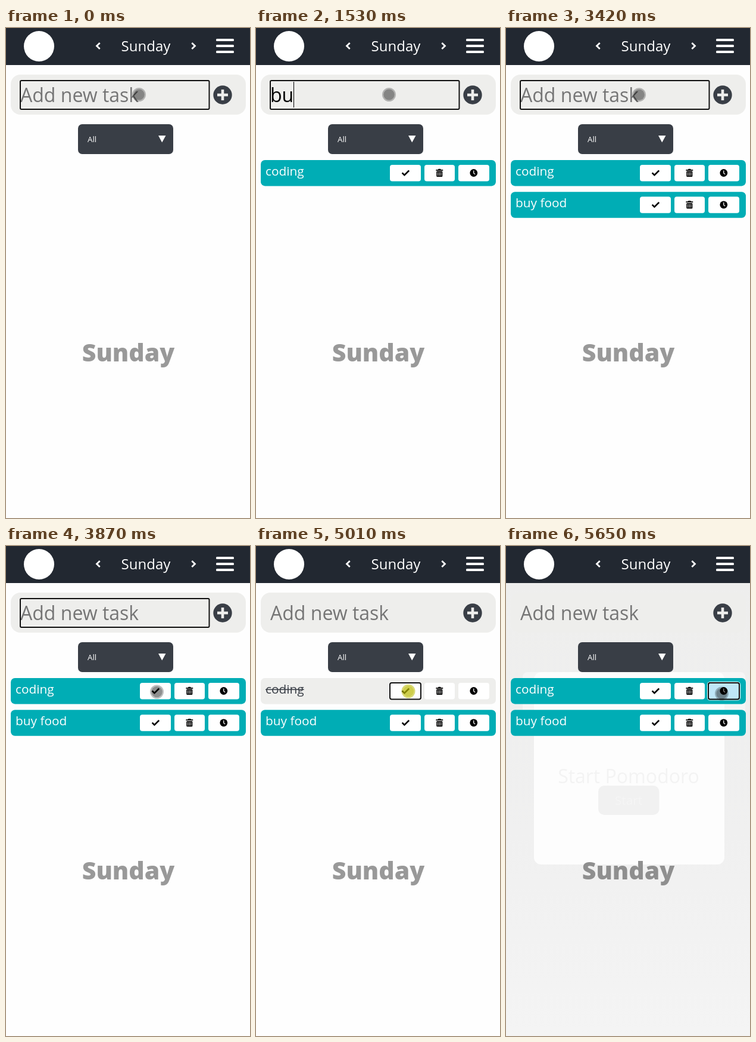
An HTML page with a canvas for the animation above (5670 ms loop, 410 by 820 pixels).

```html
<!DOCTYPE html>
<html lang="en">
<head>
<meta charset="utf-8">
<title>Day planner</title>
<style>
  html, body { margin: 0; width: 100%; height: 100%; overflow: hidden; background: #fefefe; }
  canvas { display: block; }
</style>
</head>
<body>
<canvas id="stage" width="410" height="820"></canvas>
<script>
const ctx = document.getElementById('stage').getContext('2d');
const LOOP = 5670;
const NAVY = '#222831', SLATE = '#393e46', TEAL = '#00adb5', PALE = '#eeeeec';
const BUTTONS = [225, 283, 340];

// [time, input text, number of tasks]
const TYPING = [
  [0, '', 0], [560, 'co', 0], [620, 'cod', 0], [680, 'codi', 0], [740, 'coding', 0],
  [800, '', 1], [1530, 'bu', 1], [1690, 'buy', 1], [1840, 'buy ', 1],
  [1990, 'buy f', 1], [2040, 'buy fo', 1], [2090, 'buy foo', 1],
  [2250, 'buy food', 1], [2420, '', 2]
];

// [time, x, y]
const POINTER = [
  [0, 223.5, 111.5], [3410, 223.5, 111.5], [3870, 253.5, 244], [4380, 253.5, 244],
  [4570, 268.5, 381.5], [4640, 268.5, 383], [4880, 256, 243], [5070, 256, 243],
  [5430, 362.5, 247], [LOOP, 362.5, 247]
];

// [press, release]
const CLICKS = [[4300, 4390], [4910, 5050], [5460, 5590]];

const clamp = v => Math.max(0, Math.min(1, v));
const ramp = (t, a, b) => clamp((t - a) / (b - a));
const ease = v => v * v * (3 - 2 * v);

function box(x, y, w, h, r, fill) {
  ctx.beginPath();
  ctx.roundRect(x, y, w, h, r);
  ctx.fillStyle = fill;
  ctx.fill();
}

function frame(x, y, w, h, r, color, width) {
  ctx.beginPath();
  ctx.roundRect(x, y, w, h, r);
  ctx.strokeStyle = color;
  ctx.lineWidth = width;
  ctx.stroke();
}

function disc(x, y, r, fill) {
  ctx.beginPath();
  ctx.arc(x, y, r, 0, Math.PI * 2);
  ctx.fillStyle = fill;
  ctx.fill();
}

function line(points, color, width, cap = 'butt') {
  ctx.beginPath();
  points.forEach(([x, y]) => ctx.lineTo(x, y));
  ctx.strokeStyle = color;
  ctx.lineWidth = width;
  ctx.lineCap = cap;
  ctx.lineJoin = 'miter';
  ctx.stroke();
}

function text(str, x, y, size, color, weight = 400, align = 'left') {
  ctx.font = `${weight} ${size}px "Open Sans", "Noto Sans", sans-serif`;
  ctx.textAlign = align;
  ctx.fillStyle = color;
  ctx.fillText(str, x, y);
}

function header() {
  ctx.fillStyle = NAVY;
  ctx.fillRect(0, 0, 410, 62);
  disc(55.5, 30.5, 25.5, '#fff');
  line([[157.7, 25], [152.5, 30], [157.7, 35]], '#fff', 2.8);
  line([[312.3, 25], [317.5, 30], [312.3, 35]], '#fff', 2.8);
  text('Sunday', 235, 39, 24, '#fff', 400, 'center');
  for (const y of [18, 28, 38]) box(353, y, 30, 4, 1.5, '#fff');
}

function inputBar(value, focused) {
  box(8, 78, 395, 67, 16, PALE);
  if (value) {
    text(value, 24, 124, 32, '#000');
    const x = Math.round(24 + ctx.measureText(value).width);
    ctx.fillRect(x, 90, 1, 43);
  } else {
    text('Add new task', 24, 124, 32, '#757575');
  }
  if (focused) frame(24, 88, 317.5, 48, 2, '#101010', 2);
  disc(364, 112, 15.7, SLATE);
  line([[355, 112], [373, 112]], PALE, 4.6);
  line([[364, 103], [364, 121]], PALE, 4.6);
}

function select() {
  box(121, 161, 160, 50, 7, SLATE);
  text('All', 137, 191, 13.33, '#fff');
  ctx.beginPath();
  ctx.moveTo(256, 180);
  ctx.lineTo(268.5, 180);
  ctx.lineTo(262.2, 191.5);
  ctx.fill();
}

function checkIcon(x, y) {
  line([[x - 5.8, y - 0.2], [x - 2, y + 3.6], [x + 5.8, y - 4]], '#000', 2.6);
}

function trashIcon(x, y) {
  box(x - 6, y - 5.5, 12, 1.8, 0.6, '#000');
  box(x - 2.2, y - 6.7, 4.4, 2, 0.6, '#000');
  box(x - 5, y - 2.9, 10, 9.4, 1.2, '#000');
  for (const dx of [-2.6, 0, 2.6]) line([[x + dx, y - 1.2], [x + dx, y + 4.8]], '#fff', 0.9);
}

function clockIcon(x, y) {
  disc(x, y, 6.4, '#000');
  line([[x, y - 4], [x, y + 0.4], [x + 2.4, y + 2.2]], '#fff', 1.3);
}

function task(label, y, done, focus, tapped) {
  box(8, y, 395, 43.4, 7, done ? PALE : TEAL);
  text(label, 16, y + 26, 20.8, done ? SLATE : '#fff');
  if (done) {
    const w = ctx.measureText(label).width;
    ctx.fillRect(16, y + 18.5, w, 1.5);
  }
  BUTTONS.forEach((x, i) => {
    const w = i === 1 ? 51 : 52;
    box(x, y + 8, w, 27.5, 4, tapped && i === 2 ? '#bfe7f7' : '#fff');
    if (focus === i) {
      frame(x - 1.5, y + 6.5, w + 3, 30.5, 4, '#fff', 1);
      frame(x, y + 8, w, 27.5, 3, '#101010', 2);
    }
    [checkIcon, trashIcon, clockIcon][i](x + w / 2 + (i ? -0.2 : 0.4), y + 21.5);
  });
}

function dialog(amount) {
  if (!amount) return;
  ctx.save();
  ctx.globalAlpha = amount;
  const shade = ctx.createLinearGradient(0, 62, 0, 820);
  shade.addColorStop(0, '#eeeeed');
  shade.addColorStop(0.55, '#f0f0f0');
  shade.addColorStop(1, '#f4f4f4');
  ctx.fillStyle = shade;
  ctx.fillRect(0, 62, 410, 758);
  box(28, 211, 374, 107, 8, '#f6f6f6');
  box(47, 211, 320, 322, 12, '#fdfdfd');
  text('Start Pomodoro', 206, 397, 32, '#f3f3f3', 400, 'center');
  box(155, 401, 102.5, 49, 10, '#f1f1f1');
  text('Start', 206, 433, 20.8, '#f5f5f5', 400, 'center');
  ctx.restore();
}

function pointer(t) {
  const i = POINTER.findIndex(p => p[0] > t);
  const [t0, x0, y0] = POINTER[i - 1], [t1, x1, y1] = POINTER[i];
  const k = ease(ramp(t, t0, t1));
  const x = x0 + (x1 - x0) * k, y = y0 + (y1 - y0) * k;
  const press = Math.max(...CLICKS.map(([a, b]) => Math.min(ramp(t, a - 20, a + 40), 1 - ramp(t, b - 20, b + 20))));
  const tone = Math.round(185 * press);
  const alpha = 0.44 + 0.26 * press;
  disc(x, y, 9.3, `rgba(${tone},${tone},0,${alpha})`);
  ctx.beginPath();
  ctx.arc(x, y, 10.4, 0, Math.PI * 2);
  ctx.strokeStyle = `rgba(${tone},${tone},0,${0.25 + 0.3 * press})`;
  ctx.lineWidth = 2.2;
  ctx.stroke();
}

function draw(t) {
  const [, value, count] = TYPING.filter(s => s[0] <= t).pop();
  const done = t >= CLICKS[0][1] && t < CLICKS[1][1];
  const focus = t < CLICKS[0][0] + 40 ? -1 : t < CLICKS[2][0] + 40 ? 0 : 2;
  const fade = ramp(t, 5590, 5650);

  ctx.fillStyle = '#fefefe';
  ctx.fillRect(0, 0, 410, 820);
  dialog(fade);
  header();
  inputBar(value, focus < 0);
  select();
  if (count > 0) task('coding', 221, done, focus, t >= CLICKS[2][1]);
  if (count > 1) task('buy food', 274.3, false, -1, false);
  const grey = Math.round(153 - 10 * fade);
  text('Sunday', 205.5, 557.5, 41, `rgb(${grey},${grey},${grey})`, 800, 'center');
  pointer(t);
}

function tick() {
  draw(performance.now() % LOOP);
  requestAnimationFrame(tick);
}
tick();
</script>
</body>
</html>
```
